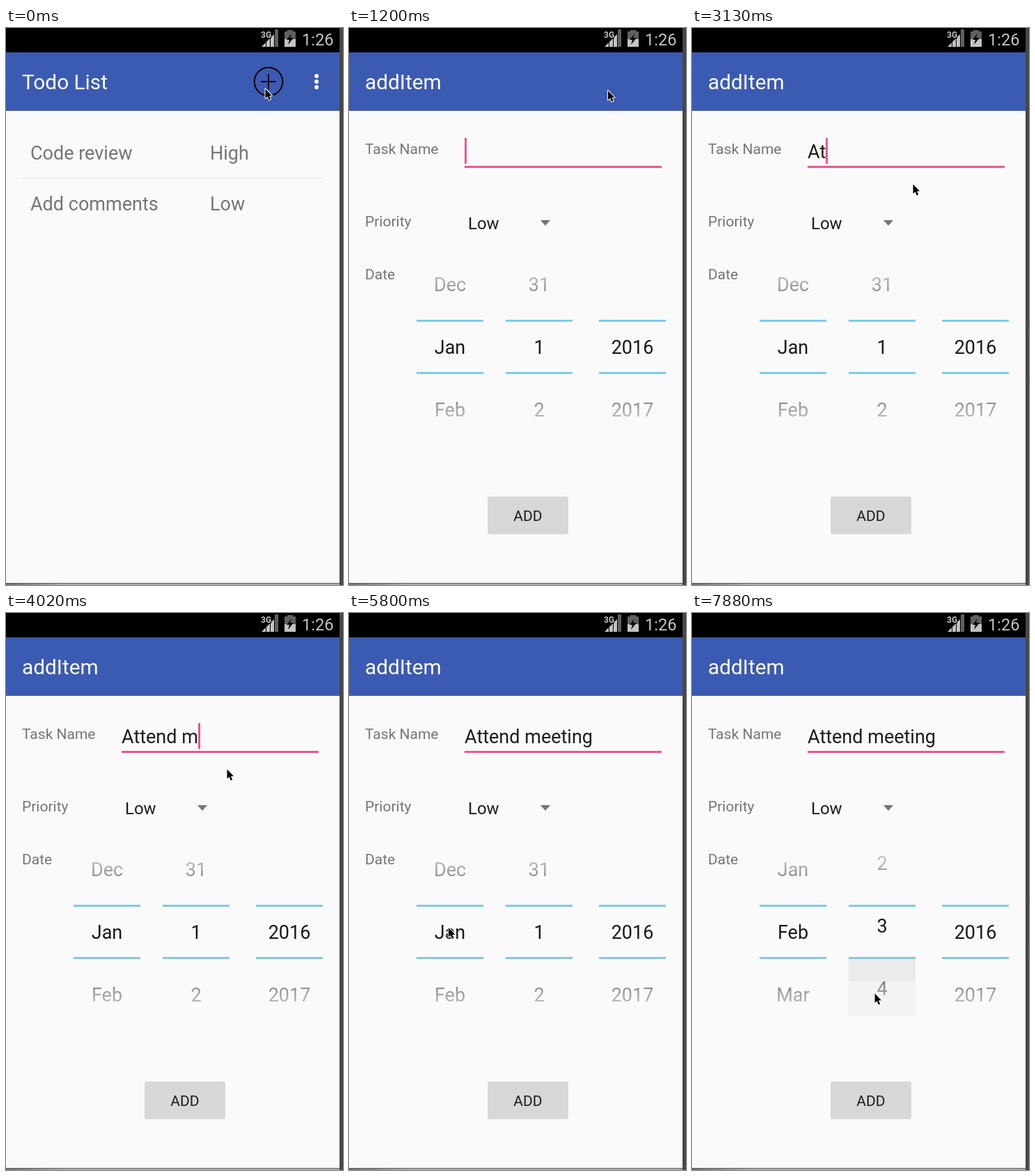
Recreate the animation shown at these times as an HTML page with a canvas. Size 484 by 800 pixels, loop 8 s.

```html
<!DOCTYPE html>
<html lang="en">
<head>
<meta charset="utf-8">
<title>Todo List</title>
<style>
html, body { margin: 0; height: 100%; overflow: hidden; background: #fafafa; }
canvas { display: block; }
</style>
</head>
<body>
<script>
const LOOP = 8000, OPEN = 1050, STEP = 148.4;
const BLUE = '#3b5ab2', PINK = '#ec568d', PAPER = '#fafafa', GREY = '#757575', INK = '#1c1c1c';
const LIT = '#c4c4c4', DIM = '#606060';
const MONTHS = ['Jan', 'Feb', 'Mar', 'Apr', 'May', 'Jun', 'Jul', 'Aug', 'Sep', 'Oct', 'Nov', 'Dec'];
const TASK = 'Attend meeting';
const SCROLL = 300, BLINK = 500;

function makeLayer() {
  const canvas = document.createElement('canvas');
  canvas.width = 484;
  canvas.height = 800;
  return canvas.getContext('2d');
}

const stage = makeLayer(), dialog = makeLayer();
let ctx = stage;
document.body.append(stage.canvas);

const clamp = (v, lo = 0, hi = 1) => Math.min(hi, Math.max(lo, v));
const mix = (a, b, f) => a + (b - a) * f;

function rect(x, y, w, h, color) {
  ctx.fillStyle = color;
  ctx.fillRect(x, y, w, h);
}

function dot(x, y, r, color) {
  ctx.beginPath();
  ctx.arc(x, y, r, 0, Math.PI * 2);
  ctx.fillStyle = color;
  ctx.fill();
}

function shape(points, color) {
  ctx.beginPath();
  points.forEach(p => ctx.lineTo(...p));
  ctx.closePath();
  ctx.fillStyle = color;
  ctx.fill();
}

function text(str, x, y, size, color, align = 'left', weight = 400) {
  ctx.font = `${weight} ${size}px Roboto, sans-serif`;
  ctx.textAlign = align;
  ctx.fillStyle = color;
  ctx.fillText(str, x, y);
}

function page(title) {
  rect(0, 35, 479, 762, PAPER);
  rect(0, 35, 479, 84, BLUE);
  text(title, 23, 88, 29.8, '#fff');
}

function frame() {
  rect(0, 0, 484, 35, '#000');
  rect(479, 0, 5, 800, '#484848');
  const edge = ctx.createLinearGradient(0, 0, 80, 0);
  edge.addColorStop(0, '#707070');
  edge.addColorStop(1, '#adadad');
  rect(0, 797, 479, 1, DIM);
  rect(0, 798, 479, 2, edge);

  shape([[367, 27], [391, 27], [391, 3]], LIT);
  rect(386, 2, 5, 25, DIM);
  for (let x = 373; x < 390; x += 6) rect(x, 2, 1, 25, '#000');
  rect(366, 4, 15, 11, '#000');
  text('3G', 366, 14, 12, LIT, 'left', 700);
  rect(404, 3, 8, 3, DIM);
  rect(400, 5, 16, 11, DIM);
  rect(400, 16, 16, 11, LIT);
  shape([[410, 8], [403, 17], [407, 17], [405, 24], [413, 14], [408, 14]], '#000');
  text('1:26', 425, 25, 23.7, LIT);
}

function listPage() {
  page('Todo List');
  dot(377, 77, 21.3, '#000');
  dot(377, 77, 19.3, BLUE);
  rect(366, 76, 22, 2, '#000');
  rect(376, 66, 2, 22, '#000');
  for (let i = -1; i <= 1; i++) dot(446, 77 + i * 8, 3, '#fff');

  [['Code review', 'High'], ['Add comments', 'Low']].forEach(([task, priority], i) => {
    text(task, 35, 189 + i * 73, 27, GREY);
    text(priority, 293, 189 + i * 73, 27, GREY);
  });
  rect(23, 215, 432, 1, '#dedede');
}

// Rows fade out towards both ends of the wheel.
function picker(cx, value, label) {
  if (value % 1) {
    rect(cx - 48, 497, 96, 32, '#ebebeb');
    rect(cx - 48, 529, 96, 50, '#f3f3f3');
  }
  const fade = ctx.createLinearGradient(0, 326, 0, 592);
  [0, 1, 1, 0].forEach((alpha, i) =>
    fade.addColorStop([0, 0.42, 0.57, 1][i], `rgba(24,24,24,${alpha})`));
  const mid = Math.round(value);
  for (let row = mid - 2; row <= mid + 2; row++)
    text(label(row), cx, 468 + (row - value) * 90, 27, fade, 'center');
  for (const y of [419, 494]) rect(cx - 48, y, 96, 3, '#7ecbe6');
}

function typedText(t) {
  const k = Math.round((t - OPEN) / STEP);
  if (k < 12) return '';
  return TASK.slice(0, k < 25 ? clamp(k - 12, 1, 10) : k - 13);
}

// The caret stays lit while typing and blinks otherwise.
function caretOn(t) {
  const idle = t < 2800 ? t - 1010 : Math.max(0, t - 5130);
  return Math.floor(idle / BLINK) % 2 === 0;
}

const spin = (t, start) => clamp((t - start) / SCROLL);

function addPage(t) {
  page('addItem');
  text('Task Name', 23, 181, 21, GREY);
  text('Priority', 23, 285, 21, GREY);
  text('Date', 23, 361, 21, GREY);

  const typed = typedText(t);
  text(typed, 166, 187, 27, INK);
  if (caretOn(t)) rect(Math.round(166 + ctx.measureText(typed).width), 158, 3, 37, PINK);
  rect(166, 198, 283, 3, PINK);

  text('Low', 171, 289, 24, INK);
  shape([[275, 276], [289, 276], [282, 284]], GREY);

  const month = spin(t, 6495);
  const day = clamp((t - 7245) / SCROLL, 0, 3);
  picker(145, month, i => MONTHS[(i + 12) % 12]);
  picker(273, day, i => (i + 31) % 31 + 1);
  picker(407, 0, i => i < 0 ? '' : 2016 + i);

  ctx.beginPath();
  ctx.roundRect(199, 673, 116, 54, 3);
  ctx.fillStyle = '#d6d7d7';
  ctx.fill();
  text('ADD', 257, 708, 21, INK, 'center');
}

// The page opens half faded in and slightly small over a dimmed list.
function openingPage(t) {
  listPage();
  rect(0, 35, 479, 762, 'rgba(0,0,0,0.17)');
  ctx = dialog;
  addPage(t);
  ctx = stage;
  ctx.save();
  ctx.globalAlpha = 0.62;
  ctx.translate(239, 396);
  ctx.scale(0.923, 0.923);
  ctx.drawImage(dialog.canvas, -239, -396);
  ctx.restore();
}

// Each move: start, end, then the place it leads to.
const MOVES = [
  [1190, 1640, 342, 215], [1640, 2090, 317, 224], [5210, 5800, 142, 452],
  [5800, 6250, 134, 540], [6690, 7290, 262, 546]
];

function pointer(t) {
  let x = 372, y = 87;
  for (const [start, end, toX, toY] of MOVES) {
    const f = clamp((t - start) / (end - start));
    x = mix(x, toX, f);
    y = mix(y, toY, f);
  }
  ctx.save();
  ctx.translate(x, y);
  ctx.lineJoin = 'round';
  ctx.lineWidth = 2;
  ctx.strokeStyle = '#fff';
  const arrow = [[0.5, 0.5], [0.5, 14], [3.6, 11.2], [5.8, 16.4], [8.2, 15.4], [6, 10.4], [10, 10.2]];
  shape(arrow, '#000');
  ctx.stroke();
  shape(arrow, '#000');
  ctx.restore();
}

function draw(now) {
  // The screen refreshes in steps.
  const k = Math.floor((now % LOOP - OPEN) / STEP + 0.05);
  const t = OPEN + k * STEP;
  frame();
  if (k < 0) listPage();
  else if (k === 0) openingPage(t);
  else addPage(t);
  pointer(t);
}

const begin = performance.now();

function tick() {
  draw(performance.now() - begin);
  requestAnimationFrame(tick);
}
tick();
</script>
</body>
</html>
```
